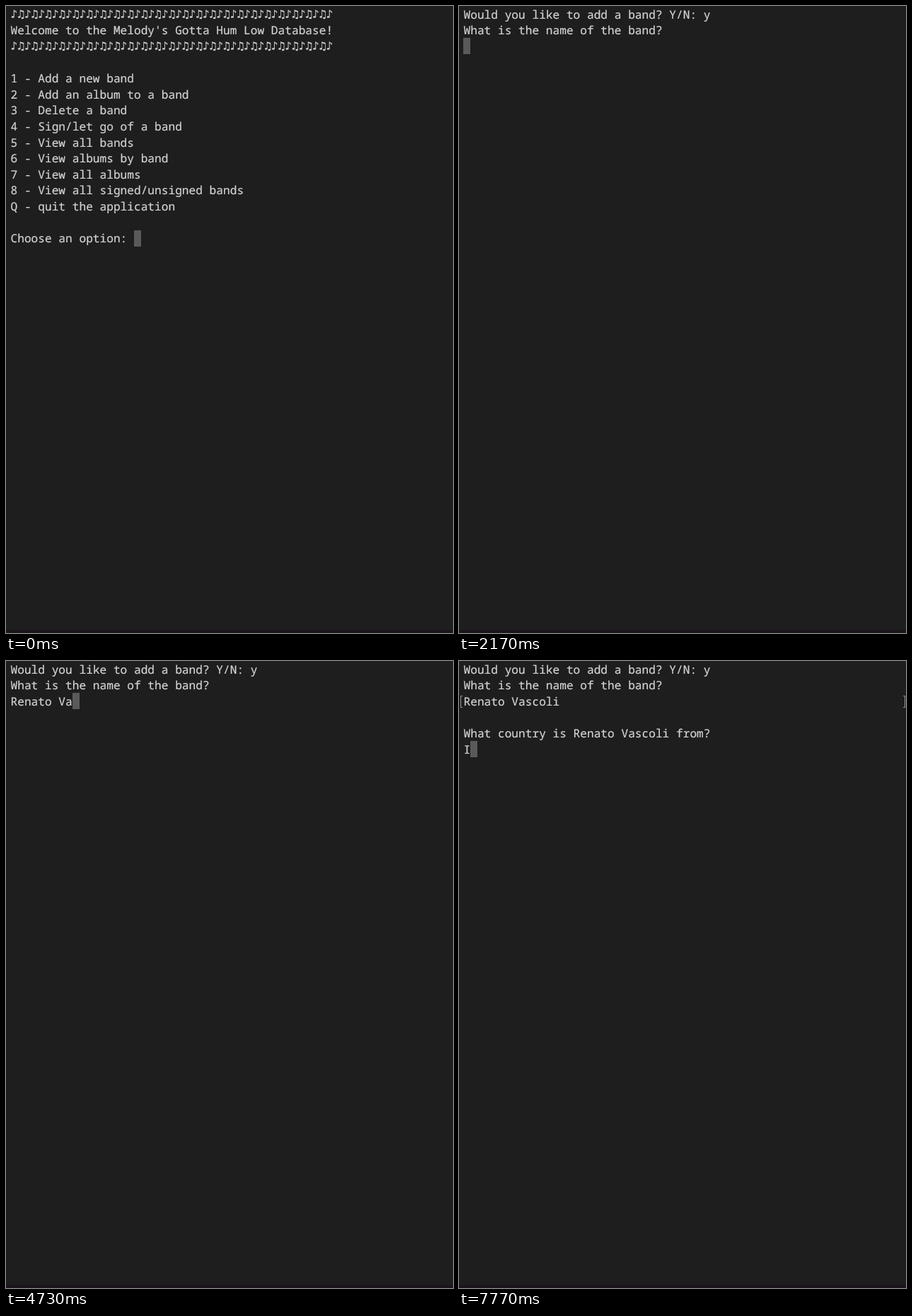
An HTML page for the animation above (8 s loop, 632 by 886 pixels).

```html
<!DOCTYPE html>
<html lang="en">
<head>
<meta charset="utf-8">
<title>Band database</title>
<style>
  html, body { margin: 0; width: 100%; height: 100%; overflow: hidden; background: #1e1e1e; }
  #screen {
    position: absolute; left: 6.5px; top: 0.5px; margin: 0; color: #d4d4d4;
    font: 16.17px/22.63px "Noto Sans Mono", "DejaVu Sans Mono", monospace;
    text-rendering: geometricPrecision; font-variant-ligatures: none;
    -webkit-text-stroke: 0.2px #d4d4d4;
  }
  #screen div { height: 22.63px; white-space: pre; }
  .notes { font-family: "DejaVu Sans Mono", monospace; letter-spacing: -0.033px; }
  #cursor { position: absolute; width: 10px; height: 23px; background: #5a5a5a; }
  .mark { position: absolute; top: 49px; width: 2px; height: 15px; border: 1px solid #989898; }
  #open { left: 2px; border-right: 0; }
  #close { left: 628px; border-left: 0; }
  #edge { position: absolute; left: 0; top: 882px; width: 632px; height: 4px; background: #1c141c; }
</style>
</head>
<body>
<div id="cursor"></div>
<div id="screen"></div>
<div id="open" class="mark"></div>
<div id="close" class="mark"></div>
<div id="edge"></div>
<script>
const LOOP = 8000, CELL = 9.7, ROW = 22.63;
const NAME = "Renato Vascoli";
const NOTES = "♪♫".repeat(23) + "♪";
const MENU = [
  NOTES,
  "Welcome to the Melody's Gotta Hum Low Database!",
  NOTES,
  "",
  "1 - Add a new band",
  "2 - Add an album to a band",
  "3 - Delete a band",
  "4 - Sign/let go of a band",
  "5 - View all bands",
  "6 - View albums by band",
  "7 - View all albums",
  "8 - View all signed/unsigned bands",
  "Q - quit the application",
  "",
  "Choose an option: "
];
const ASK = "Would you like to add a band? Y/N: ";

// Key presses while typing the name; one of them deletes a letter
const KEYS = [3270, 3430, 3530, 3770, 3835, 3900, 4230, 4530, 4730,
              4930, 5030, 5270, 5570, 5770, 5900, 6070];
const DELETE = 5570;

const el = id => document.getElementById(id);
const [screenBox, cursor, open, close] = ["screen", "cursor", "open", "close"].map(el);

function linesAt(t) {
  if (t < 870) return MENU;
  if (t < 2170) return [ASK];
  const typed = KEYS.reduce((n, k) => t < k ? n : n + (k === DELETE ? -1 : 1), 0);
  const lines = [ASK + "y", "What is the name of the band?", NAME.slice(0, typed)];
  if (t >= 6370) lines.push("", `What country is ${NAME} from?`, t < 7770 ? "" : "I");
  return lines;
}

let shown;
function draw(now) {
  const t = now % LOOP, lines = linesAt(t), key = lines.join("\n");
  if (key !== shown) {
    shown = key;
    screenBox.replaceChildren(...lines.map(text => {
      const row = document.createElement("div");
      row.textContent = text;
      if (text === NOTES) row.className = "notes";
      return row;
    }));
    const last = lines.length - 1;
    cursor.style.left = Math.round(6.4 + lines[last].length * CELL) + "px";
    cursor.style.top = Math.round(last * ROW) + "px";
    open.hidden = close.hidden = t < 6370;
  }
}

const start = performance.now();
function tick() {
  draw(performance.now() - start);
  requestAnimationFrame(tick);
}
tick();
</script>
</body>
</html>
```
